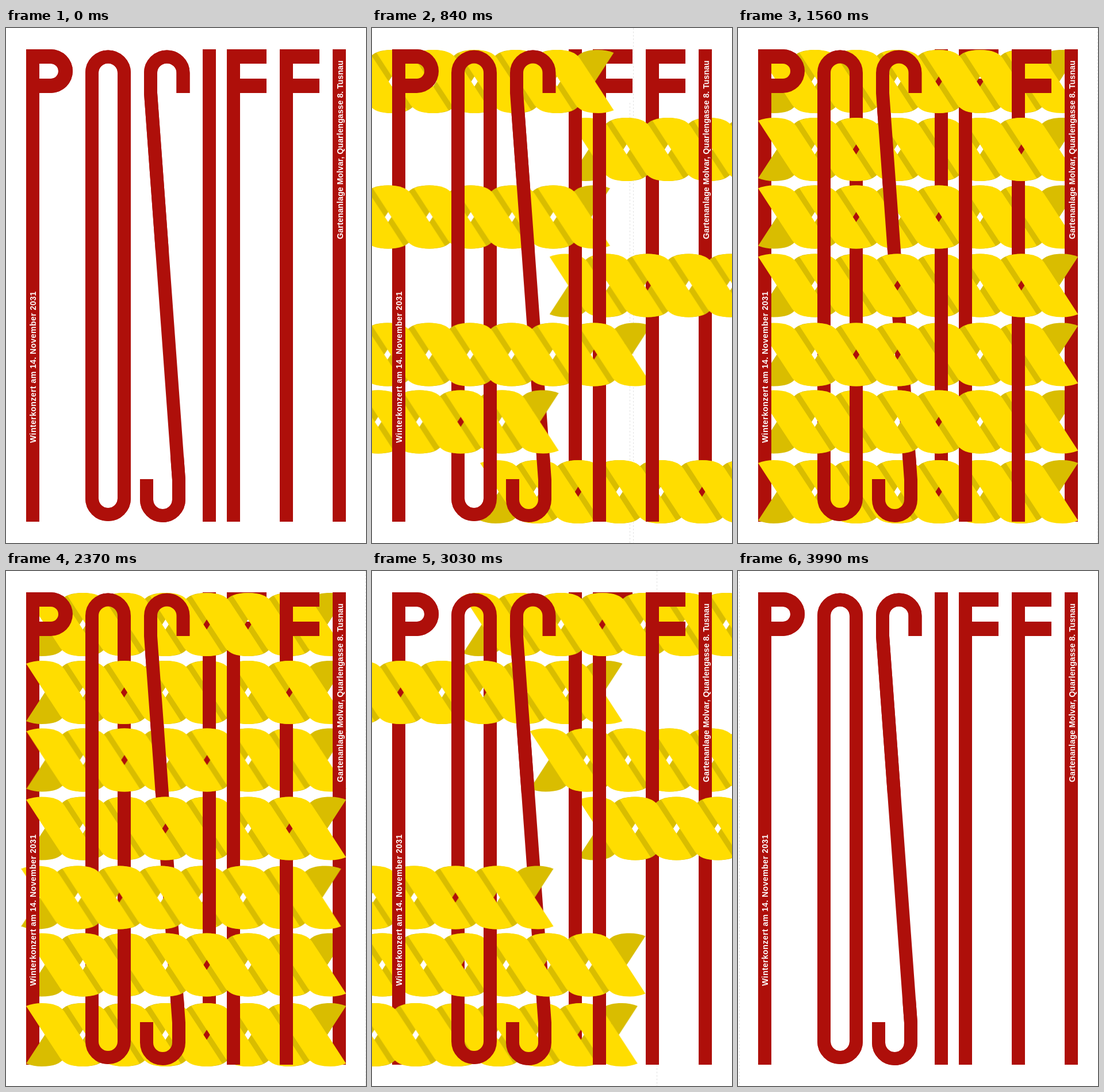
An HTML page without scripts for the animation above (4.23 s loop, 626 by 895 pixels).

```html
<!DOCTYPE html>
<html lang="de">
<head>
<meta charset="utf-8">
<title>Posiffi</title>
<style>
  html, body { margin: 0; width: 100%; height: 100%; overflow: hidden; background: #fff; }
  svg { display: block; width: 626px; height: 895px; }

  .letters { fill: #ae0f0a; }
  .stroke { fill: none; stroke: #ae0f0a; stroke-width: 23; }
  .front { fill: #fd0; }
  .back { fill: #d9bd00; }
  .edge { stroke: #e2e2e2; stroke-dasharray: 3 3; }
  text { fill: #fff; font: bold 14px "Liberation Sans", Arial, sans-serif; }

  /* Each strip slides one stage width in, rests, and slides one out. */
  .slide {
    --left: translateX(-591px);
    --rest: translateX(35px);
    --right: translateX(661px);
    animation: 4230ms cubic-bezier(.3333, 0, .6667, 1) infinite;
  }
  .r1 { animation-name: r1; }
  .r2 { animation-name: r2; }
  .r3 { animation-name: r3; }
  .r4 { animation-name: r4; }
  .r5 { animation-name: r5; }
  .r6 { animation-name: r6; }
  .r7 { animation-name: r7; }

  @keyframes r1 {
    0%, .95% { transform: var(--left); }
    29.79%, 63.12% { transform: var(--rest); }
    93.12%, 100% { transform: var(--right); }
  }
  @keyframes r2 {
    0%, 2.72% { transform: var(--right); }
    36.76%, 61.16% { transform: var(--rest); }
    93.4%, 100% { transform: var(--left); }
  }
  @keyframes r3 {
    0%, 4.42% { transform: var(--left); }
    28.25%, 55.44% { transform: var(--rest); }
    93.92%, 100% { transform: var(--right); }
  }
  @keyframes r4 {
    0%, 1.73% { transform: var(--right); }
    35.22%, 57.28% { transform: var(--rest); }
    85.37%, 100% { transform: var(--right); }
  }
  @keyframes r5 {
    0%, 1.73% { transform: var(--left); }
    26.34%, 53.29% { transform: var(--rest); }
    93.19%, 100% { transform: var(--left); }
  }
  @keyframes r6 {
    0%, 1.11% { transform: var(--left); }
    35.27%, 64.78% { transform: var(--rest); }
    89.79%, 100% { transform: var(--left); }
  }
  @keyframes r7 {
    0%, .33% { transform: var(--right); }
    29.17%, 61.73% { transform: var(--rest); }
    95.63%, 100% { transform: var(--left); }
  }
</style>
</head>
<body>
<svg viewBox="0 0 626 895">
  <defs>
    <path id="band" d="M0 5Q13 0 27 0C48 0 59 5 66 14L93 55L125.5 105Q112.5 110 98.5 110C77.5 110 66.5 105 59.5 96L32.5 55Z"/>
    <g id="bands">
      <use href="#band"/>
      <use href="#band" x="71.8"/>
      <use href="#band" x="143.6"/>
      <use href="#band" x="215.4"/>
      <use href="#band" x="287.2"/>
      <use href="#band" x="359"/>
      <use href="#band" x="430.8"/>
    </g>
    <g id="pasta">
      <use href="#bands" class="back" transform="matrix(1 0 0 -1 0 110)"/>
      <use href="#bands" class="front"/>
    </g>

    <path id="stem" d="M0 37H23V858H0Z"/>
    <path id="f" d="M0 37H69V62H23V88H69V113H23V858H0Z"/>
    <g id="word" class="letters">
      <use href="#stem" x="35"/>
      <path d="M57 37H78A38 38 0 0 1 78 113H57V88H78A13 13 0 0 0 78 62H57Z"/>
      <path class="stroke" d="M149.5 78A28 28 0 0 1 205.5 78V817.5A28 28 0 0 1 149.5 817.5Z"/>
      <path class="stroke" d="M308 113V78A28.2 28 0 0 0 251.5 78V113L300.5 785V819.5A28 28 0 0 1 244.5 819.5V784"/>
      <use href="#stem" x="342"/>
      <use href="#f" x="384"/>
      <use href="#f" x="476"/>
      <use href="#stem" x="568"/>
    </g>

    <!-- Parts of the letters that pass over the pasta -->
    <clipPath id="over">
      <path d="M30 30H120V150H30Z M30 447H60V744H30Z"/>
      <path d="M136 30H178V508H136Z M136 744H178V870H136Z"/>
      <path d="M178 30H219V150H178Z M190 388H219V507H190Z M178 625H219V870H178Z"/>
      <path d="M230 30H322V388H230Z M230 744H322V870H230Z"/>
      <path d="M340 150H367V270H340Z M340 388H367V626H340Z"/>
      <path d="M382 150H455V507H382Z M382 744H455V870H382Z"/>
      <path d="M474 30H547V150H474Z M474 270H547V388H474Z M474 507H547V870H474Z"/>
      <path d="M566 30H593V388H566Z M566 625H593V685H566Z"/>
    </clipPath>
  </defs>

  <rect width="626" height="895" fill="#fff"/>
  <g class="edge">
    <path class="slide r1" d="M590.5 0V895"/>
    <path class="slide r3" d="M590.5 130V895"/>
    <path class="slide r7" d="M590.5 0V895"/>
  </g>

  <use href="#word"/>
  <g class="slide r1"><use href="#pasta" y="38"/></g>
  <g class="slide r2"><use href="#pasta" y="156"/></g>
  <g class="slide r3"><use href="#pasta" y="273.5"/></g>
  <g class="slide r4"><use href="#pasta" y="392.5"/></g>
  <g class="slide r5"><use href="#pasta" y="512.5"/></g>
  <g class="slide r6"><use href="#pasta" y="629.5"/></g>
  <g class="slide r7"><use href="#pasta" y="751"/></g>
  <g clip-path="url(#over)"><use href="#word"/></g>

  <text transform="translate(52 721) rotate(-90)" letter-spacing=".45">Winterkonzert am 14. November 2031</text>
  <text transform="translate(585.5 367) rotate(-90)" letter-spacing=".1">Gartenanlage Molvar, Quarlengasse 8. Tusnau</text>
</svg>
</body>
</html>
```
